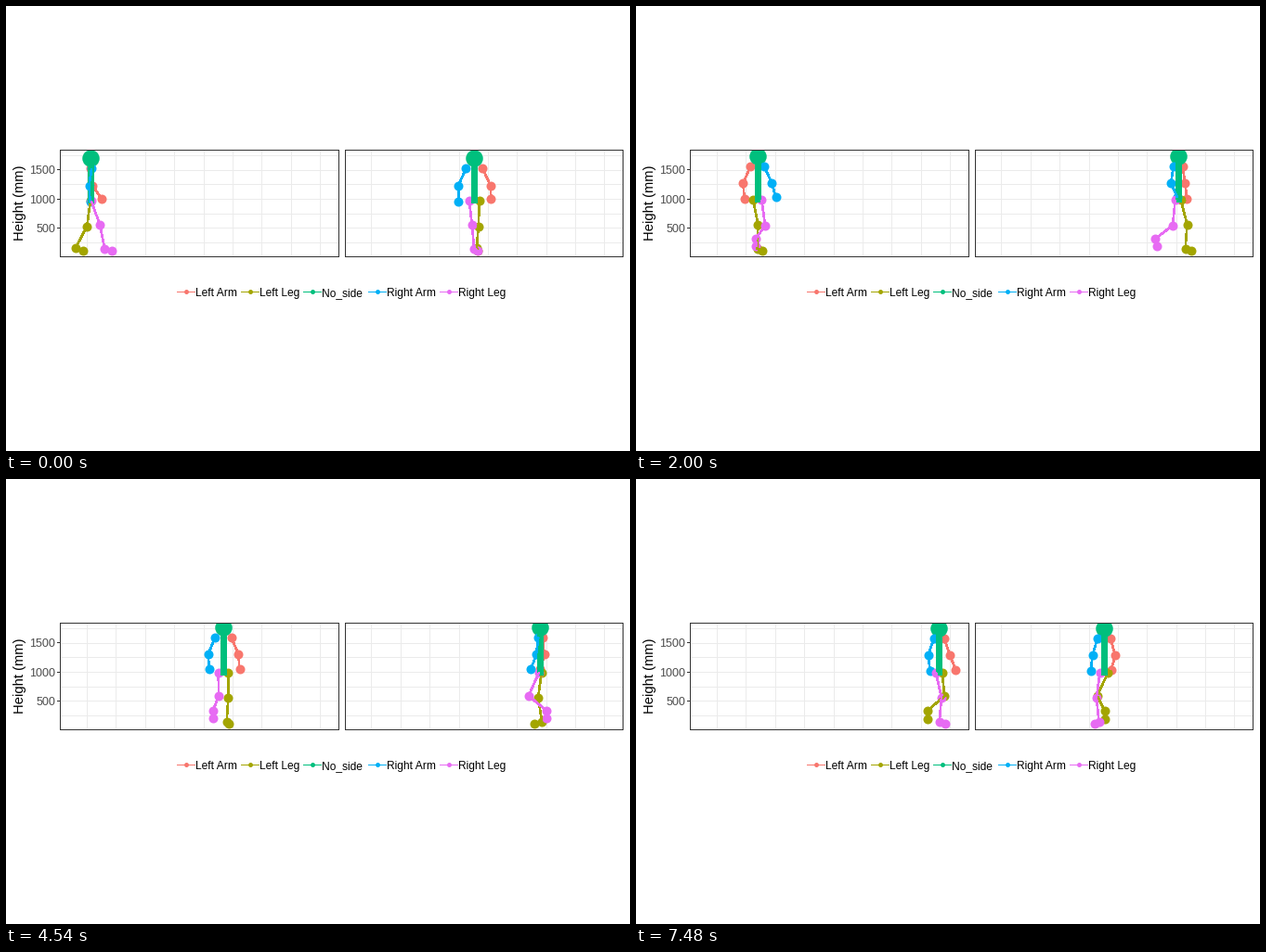
Write a matplotlib script that moves like this. It is 672x480 px and loops after 7500 ms.

```python
import numpy as np
import matplotlib.pyplot as plt
from matplotlib.animation import FuncAnimation
from matplotlib.patches import Rectangle

W, H, DPI = 672, 480, 96
FRAMES, STEP = 375, 20
PX = 72 / DPI
SERIES = {"Left Arm": "#F8766D", "Left Leg": "#A3A500", "No_side": "#00BF7D",
          "Right Arm": "#00B0F6", "Right Leg": "#E76BF3"}

STRIDE = 1210                    # ms per gait cycle
SPEED = 0.051                    # px per ms
THIGH, SHANK, FOOT = 27.7, 26, 8.5

# waypoints: time, x, y, heading in degrees
ROUTE = np.array([(0, 91, 504, 5), (1300, 122.5, 545, 95), (2680, 156, 608.5, 18),
                  (3600, 207, 617, -32), (4580, 234, 573, -78), (5480, 243, 530.5, -55),
                  (6720, 296, 501, 5), (7480, 326, 503.5, -38)])


def axes_of(deg):
    """Forward, left and vertical unit vectors."""
    c, s = np.cos(np.radians(deg)), np.sin(np.radians(deg))
    return np.array([(c, s, 0), (-s, c, 0), (0, 0, 1)])


def route(t):
    """Ground point and heading: Hermite curves at a steady walking speed."""
    times = ROUTE[:, 0]
    deg = np.interp(t, times, ROUTE[:, 3])
    s = np.clip(t, times[0], times[-1])
    i = min(np.searchsorted(times, s, side="right"), len(times) - 1)
    a, b = ROUTE[i - 1], ROUTE[i]
    span = b[0] - a[0]
    u = (s - a[0]) / span
    ma, mb = (axes_of(k[3])[0, :2] * SPEED * span for k in (a, b))
    xy = (a[1:3] * (1 + 2 * u) * (1 - u) ** 2 + b[1:3] * u * u * (3 - 2 * u)
          + ma * u * (1 - u) ** 2 + mb * u * u * (u - 1))
    xy = xy + axes_of(deg)[0, :2] * SPEED * (t - s)
    return np.append(xy, 0), deg


def arm(head, body, phase, side):
    swing = side * np.cos(2 * np.pi * phase)
    shoulder = head + (0, 9 * side, 11.3) @ body
    elbow = shoulder + (3.4 * swing, 8 * side, 18.3) @ body
    wrist = elbow + (5.3 + 4.3 * swing, 0, 16 - 1.5 * swing) @ body
    return [shoulder, elbow, wrist]


def footprint(step, side):
    """Where a foot stands: under the body a quarter cycle after heel strike."""
    spot, deg = route((step + 0.24) * STRIDE)
    return spot + (0, 4 * side, 0) @ axes_of(deg), deg


def leg(pelvis, body, phase, side):
    lag = 0.5 if side > 0 else 0
    n, v = divmod(phase + lag, 1)
    (p, p_deg), (q, q_deg) = (footprint(n + k - lag, side) for k in (0, 1))
    u = np.clip((v - 0.57) / 0.4, 0, 1)
    u = u * u * (3 - 2 * u)
    lift = np.sin(np.pi * np.clip((v - 0.45) / 0.5, 0, 1)) ** 1.5
    ankle = p + (q - p) * u + (0, 0, 261 - 12 * lift)
    pitch = np.radians(17 + 70 * lift)
    toe = ankle + (FOOT * np.cos(pitch), 0, FOOT * np.sin(pitch)) @ axes_of(p_deg + (q_deg - p_deg) * u)

    # the knee bends forward between hip and ankle
    hip = pelvis + (0, 5.5 * side, 0) @ body
    reach = np.linalg.norm(ankle - hip)
    d = (ankle - hip) / reach
    reach = min(reach, THIGH + SHANK)
    along = (THIGH ** 2 - SHANK ** 2 + reach ** 2) / (2 * reach)
    out = np.sqrt(max(THIGH ** 2 - along ** 2, 0))
    front = body[0] - (body[0] @ d) * d
    knee = hip + d * along + front / np.linalg.norm(front) * out
    return [hip, knee, ankle, toe]


def pose(t):
    """Joints of each series as (x, y, height) rows."""
    spot, deg = route(t)
    body, phase = axes_of(deg), t / STRIDE - 0.02
    bob = np.cos(4 * np.pi * phase)
    head = spot + (0, 0, 161.2 + 2.2 * bob)
    pelvis = spot + (0, 0, 208.8 + 0.9 * bob)
    limbs = [arm(head, body, phase, 1), leg(pelvis, body, phase, 1),
             [head, pelvis + (0, 0, 2)],
             arm(head, body, phase, -1), leg(pelvis, body, phase, -1)]
    return [np.array(limb) for limb in limbs]


plt.rcParams["font.family"] = "Liberation Sans"
fig = plt.figure(figsize=(W / DPI, H / DPI), dpi=DPI, facecolor="white")
ax = fig.add_axes([0, 0, 1, 1])
ax.set(xlim=(-0.4, W - 0.4), ylim=(H - 0.6, -0.6))   # whole numbers hit pixel centres
ax.axis("off")


def stroke(xs, ys, color, width=1, z=1, **kw):
    line, = ax.plot(xs, ys, color=color, lw=width * PX, zorder=z, antialiased=False,
                    solid_capstyle="butt", markeredgewidth=0, **kw)
    return line


def label(x, y, text, size, color="black", **kw):
    ax.text(x, y, text, fontsize=size * PX, color=color, **kw)


# panels
panels = []
for left, right, first in ((58, 358, 87), (365, 664, 393.3)):
    for k in range(9):
        x = round(first + 31.4 * k)
        stroke([x, x], [154, 269], "#EBEBEB")
    for k in range(7):
        y = round(159.8 + 15.7 * k)
        stroke([left, right], [y, y], "#EBEBEB")
    box = Rectangle((left, 154), right - left, 115, fill=False, ec="#333333",
                    lw=PX, zorder=9, antialiased=False)
    panels.append(ax.add_patch(box))

for value, y in ((1500, 175), (1000, 207), (500, 238)):
    stroke([55, 58], [y, y], "#333333")
    label(52.5, y + 5, str(value), 12.5, "#4D4D4D", ha="right", va="baseline")
label(15, 211.5, "Height (mm)", 14.8, rotation=90, ha="center", va="center")

# legend
for (name, color), x in zip(SERIES.items(), (184, 253, 320, 390, 467)):
    stroke([x, x + 19], [307, 307], color)
    stroke([x + 9.5], [307], color, marker="o", ms=5 * PX)
    label(x + 20, 312, name, 12, va="baseline")

# walker: dots lie under the lines
dots, lines = [], []
for box in panels:
    for name, color in SERIES.items():
        trunk = name == "No_side"
        dots.append(stroke([], [], color, z=3, ls="none", marker="o",
                           ms=(18.5 if trunk else 10) * PX,
                           markevery=2 if trunk else 1))
        lines.append(stroke([], [], color, 6.5 if trunk else 1.6, z=4))
        for artist in (dots[-1], lines[-1]):
            artist.set_clip_path(box)


def update(frame):
    limbs = pose(frame * STEP)
    for n, (dot, line) in enumerate(zip(dots, lines)):
        view, i = divmod(n, len(limbs))
        for artist in (dot, line):
            artist.set_data(limbs[i][:, view], limbs[i][:, 2])
    return dots + lines


anim = FuncAnimation(fig, update, frames=FRAMES, interval=STEP, repeat=True,
                     repeat_delay=0, blit=False)
plt.show()
```
